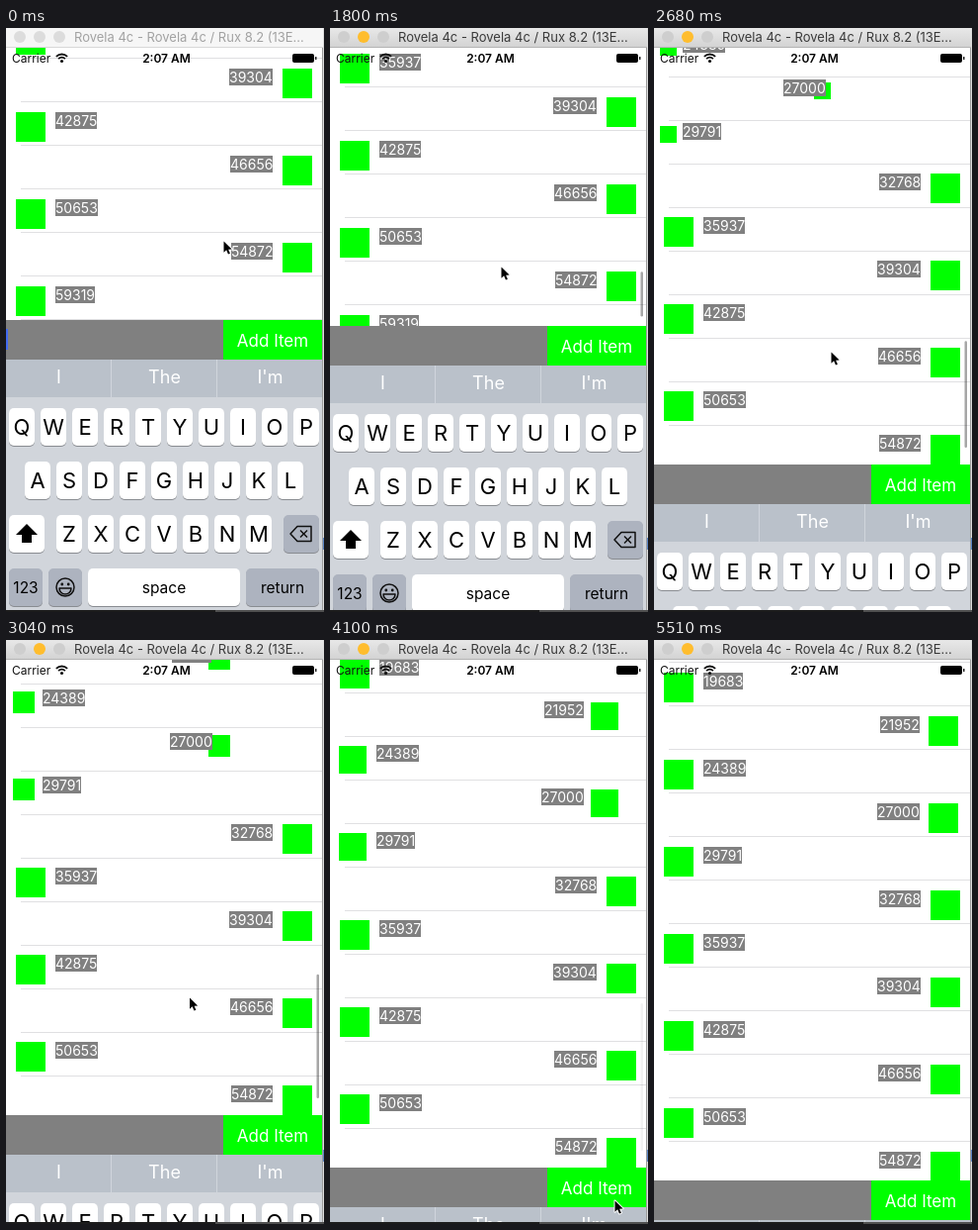
These frames come from a looping animation (322 by 590 pixels, 5.61 s). An HTML page with a canvas:

```html
<!DOCTYPE html>
<html lang="en">
<head>
<meta charset="utf-8">
<title>Chat list</title>
<style>
html, body { margin: 0; width: 100%; height: 100%; overflow: hidden; background: #fff; }
canvas { display: block; }
</style>
</head>
<body>
<canvas id="stage" width="322" height="590"></canvas>
<script>
const c = document.getElementById('stage').getContext('2d');
const LOOP = 5610, KEYBOARD = 253, SCROLL = 48.4, ROW = 44;
const GREEN = '#00ff00', GREY = '#808080', DARK_KEY = '#adb3bf';

// Stops of the pointer: step, x, y
const STOPS = [[-1, 220, 214], [3, 173, 190], [6, 173, 240], [11, 179, 326],
  [15, 192, 394], [19, 288, 565], [20, 302, 600]];

const clamp = v => Math.max(0, Math.min(1, v));
const smooth = v => (v = clamp(v), v * v * (3 - 2 * v));
const snap = v => Math.ceil(v - .5);

function stepAt(t) {
  if (t < 360) return -1;
  if (t < 1440) return Math.min(3, Math.floor((t - 360) / 180));
  return 4 + Math.floor((t - 1440) / 176.8);
}

// Critically damped spring, a little late at the start
function slideAt(k) {
  const s = Math.max(0, Math.min(.34 * (k - 5.3), .3276 * (k - 5.084)));
  return 1 - (1 + s) * Math.exp(-s);
}

function pointerAt(k) {
  const n = STOPS.findIndex(p => p[0] > k);
  if (n < 0) return STOPS.at(-1).slice(1);
  const a = STOPS[n - 1], b = STOPS[n];
  const f = (k - a[0]) / (b[0] - a[0]);
  return [1, 2].map(i => a[i] + (b[i] - a[i]) * f);
}

function rect(x, y, w, h, color) {
  c.fillStyle = color;
  c.fillRect(x, y, w, h);
}

function round(x, y, w, h, r, color) {
  c.fillStyle = color;
  c.beginPath();
  c.roundRect(x, y, w, h, r);
  c.fill();
}

function circle(x, y, r, color) {
  c.fillStyle = color;
  c.beginPath();
  c.arc(x, y, r, 0, 7);
  c.fill();
}

function poly(points, close = true) {
  c.beginPath();
  points.forEach(([x, y]) => c.lineTo(x, y));
  if (close) c.closePath();
}

function font(size, weight = 400) {
  c.font = `${weight} ${size}px Inter, "Liberation Sans", sans-serif`;
}

// y is the middle of the capitals
function text(s, x, y, size, color, align = 'center', weight = 400) {
  font(size, weight);
  c.fillStyle = color;
  c.textAlign = align;
  c.fillText(s, x, y + size * .364);
}

// Four of the rows grow into place together with the sliding keyboard.
function cell(n, top, slide) {
  const p = n >= 28 && n <= 31 ? slide : 1;
  const right = n % 2 === 0;
  const label = String(n ** 3);
  font(14);
  const w = Math.round(c.measureText(label).width);
  const x = snap((right ? 270 - w : 50) * p);
  const y = snap(top + 18.5 * p - 8.5);
  const left = snap((right ? 280 : 10) * p), up = snap(top + 10 * p);
  const size = Math.round(30 * p);
  rect(left, up, size, size, GREEN);
  rect(x, y, w, 17, GREY);
  text(label, x, y + 8.5, 14, '#fff', 'left');
  rect(15, Math.ceil(top) + 43, 305, 1, '#e0e0e2');
}

function statusBar() {
  text('Carrier', 6, 30.5, 12, '#111', 'left');
  text('2:07 AM', 162.5, 30.5, 12, '#000', 'center', 600);
  c.strokeStyle = '#111';
  c.lineWidth = 1.8;
  for (const r of [4.8, 8]) {
    c.beginPath();
    c.arc(56.5, 34.5, r, -Math.PI * .75, -Math.PI * .25);
    c.stroke();
  }
  circle(56.5, 33.5, 1.6, '#111');
  round(290, 26, 22, 9, 2, '#000');
  rect(313, 29, 1.5, 3, '#222');
}

function key(x, y, w, color = '#fff', label = '', size = 22) {
  round(x, y + 1, w, 38, 5, '#898c91');
  round(x, y, w, 38, 5, color);
  text(label, x + w / 2, y + 19, size, '#000');
}

function keyboard(y) {
  rect(0, y, 320, KEYBOARD, '#d1d5db');
  rect(0, y, 320, 38, '#bac1ca');
  ['I', 'The', "I'm"].forEach((s, i) => {
    if (i) rect(i * 107 - 1, y, 1, 38, '#d0d5dc');
    text(s, 53.5 + i * 107, y + 17.5, 18, '#fff');
  });

  ['QWERTYUIOP', 'ASDFGHJKL', 'ZXCVBNM'].forEach((letters, row) => {
    const x = 163 - letters.length * 16;
    [...letters].forEach((s, i) => key(x + i * 32, y + 49 + row * 54, 26, '#fff', s));
  });
  key(3, y + 157, 36);
  key(281, y + 157, 36, DARK_KEY);
  key(3, y + 211, 34, DARK_KEY, '123', 15.5);
  key(43, y + 211, 34, DARK_KEY);
  key(83, y + 211, 154, '#fff', 'space', 15.5);
  key(243, y + 211, 74, DARK_KEY, 'return', 15.5);

  c.save();
  c.translate(21, y + 176);
  poly([[0, -10], [11, 1], [-11, 1]]);
  c.fillStyle = '#000';
  c.fill();
  rect(-5, 0, 10, 9, '#000');

  c.translate(278, 0);
  c.strokeStyle = '#111';
  c.lineWidth = 1.5;
  c.lineJoin = 'round';
  poly([[-11, 0], [-4, -7.5], [10, -7.5], [10, 7.5], [-4, 7.5]]);
  c.stroke();
  for (const d of [-1, 1]) {
    poly([[-1, -3.5 * d], [6, 3.5 * d]], false);
    c.stroke();
  }

  c.translate(-239, 54);
  c.beginPath();
  c.arc(0, 0, 9, 0, 7);
  c.stroke();
  circle(-3.2, -3, 1.4, '#111');
  circle(3.2, -3, 1.4, '#111');
  c.beginPath();
  c.arc(0, 1, 6, 0, Math.PI);
  c.closePath();
  c.stroke();
  c.restore();
}

function titleBar(active) {
  const g = c.createLinearGradient(0, 0, 0, 20);
  g.addColorStop(0, active ? '#e8e8e8' : '#f6f6f6');
  g.addColorStop(1, active ? '#d2d2d2' : '#f6f6f6');
  rect(0, 0, 321, 20, g);
  rect(0, 19, 321, 1, active ? '#b4b4b4' : '#d8d8d8');
  const light = active ? '#cecece' : '#dcdcdc';
  circle(14, 9, 6, light);
  circle(34, 9, 6, active ? '#ffbd2e' : light);
  circle(54, 9, 6, light);
  text('Rovela 4c - Rovela 4c / Rux 8.2 (13E...', 69, 9.5, 13, active ? '#3a3a3a' : '#a2a2a2', 'left');
}

function pointer(x, y) {
  c.save();
  c.translate(x + .5, y + 1.5);
  c.scale(.8, .8);
  poly([[0, 0], [0, 14], [3.3, 11], [5.6, 16.3], [8, 15.2], [5.8, 10.2], [10.2, 10]]);
  c.lineJoin = 'round';
  c.lineWidth = 2.5;
  c.strokeStyle = '#fff';
  c.stroke();
  c.fillStyle = '#000';
  c.fill();
  c.restore();
}

function backdrop() {
  rect(0, 0, 322, 590, '#fff');
  rect(0, 588, 212, 2, '#1c1c1c');
  rect(212, 588, 110, 2, '#505050');
  rect(320, 0, 1, 588, '#9c9c9c');
  rect(321, 0, 1, 588, '#dedede');
  rect(321, 515, 1, 12, '#5b86c9');
}

function draw(t) {
  const k = stepAt(t);
  const slide = slideAt(k);
  const scroll = SCROLL * smooth((k - 4.08) / 4);
  const bar = Math.round(295 + KEYBOARD * slide);
  const shift = Math.round((KEYBOARD * slide + scroll) * 2) / 2;

  backdrop();
  c.save();
  c.beginPath();
  c.rect(0, 20, 320, 568);
  c.clip();
  for (let n = 26; n <= 39; n++) cell(n, 31 + (n - 34) * ROW + shift, slide);

  if (k >= 5) {
    const h = 42.5 + 113 * slide;
    const end = bar - 3 - scroll * .29;
    round(314.5, end - h, 2.5, h, 1.25, `rgba(0,0,0,${.35 * clamp((20 - k) / 7)})`);
  }
  statusBar();

  keyboard(bar + 40);
  rect(0, bar, 220, 40, GREY);
  rect(220, bar, 100, 40, GREEN);
  text('Add Item', 270, bar + 20.5, 17, '#fff');
  c.globalAlpha = clamp((2 - k) / 3);
  rect(0, 304, 2, 21, '#426bf2');
  c.restore();

  titleBar(k >= 4);
  pointer(...pointerAt(k));
}

const start = performance.now();
function tick() {
  draw((performance.now() - start) % LOOP);
  requestAnimationFrame(tick);
}
tick();
</script>
</body>
</html>
```
